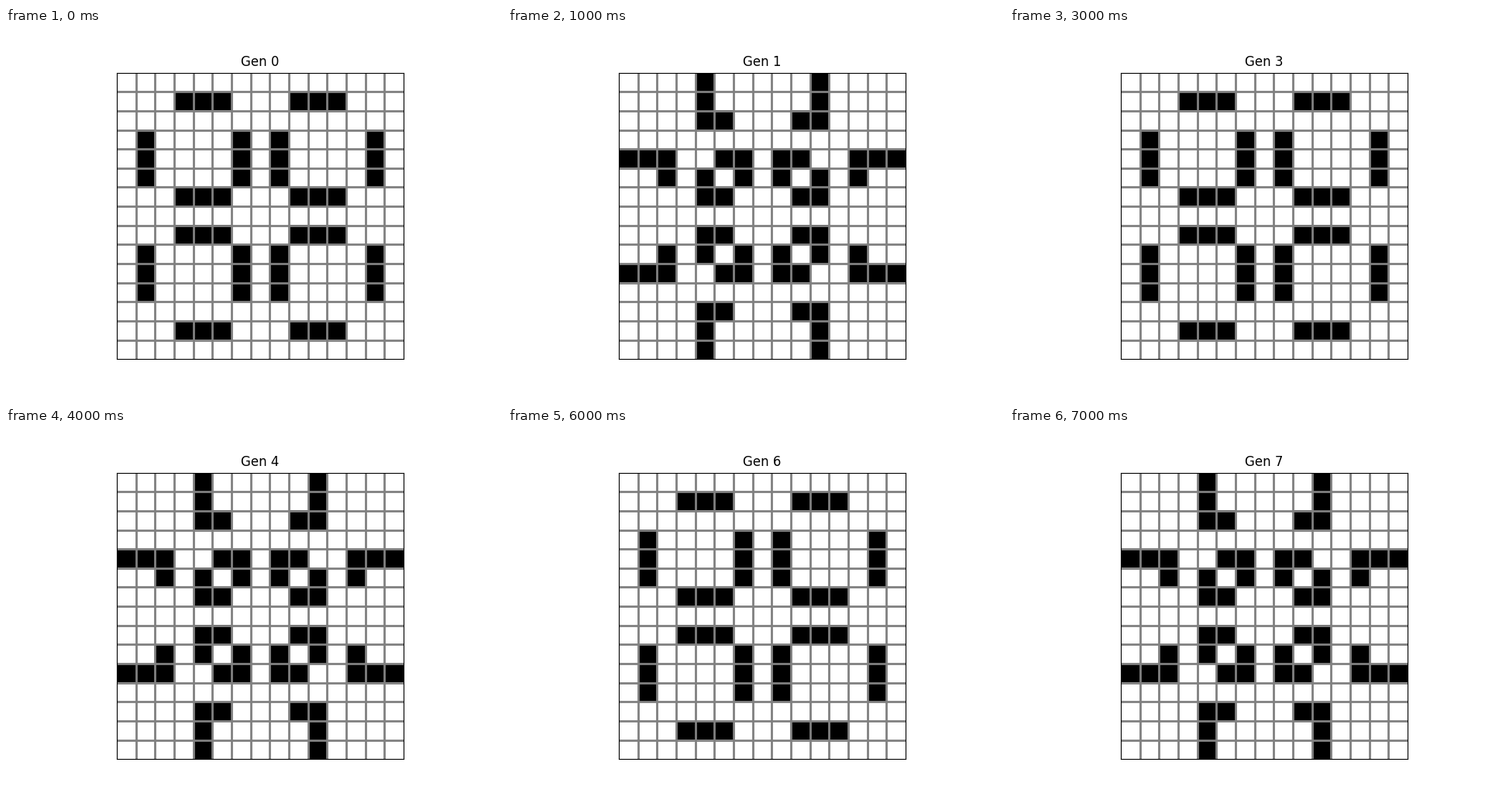
Write a matplotlib script that moves like this. It is 640 px wide and 480 px high and loops after 8 s.

```python
import numpy as np
import matplotlib.pyplot as plt
from matplotlib.animation import FuncAnimation

SIZE = 15
FRAMES = 8


def pulsar():
    """Period-3 oscillator, built from one bar pattern and its transpose."""
    grid = np.zeros((SIZE, SIZE), dtype=int)
    bars = [3, 4, 5, 9, 10, 11]
    rows = [1, 6, 8, 13]
    grid[np.ix_(rows, bars)] = 1
    return grid | grid.T


def step(grid):
    """One Game of Life generation with dead cells outside the board."""
    padded = np.pad(grid, 1)
    near = sum(padded[r:r + SIZE, c:c + SIZE]
               for r in range(3) for c in range(3)) - grid
    return ((near == 3) | ((grid == 1) & (near == 2))).astype(int)


generations = [pulsar()]
while len(generations) < FRAMES:
    generations.append(step(generations[-1]))

fig, ax = plt.subplots(figsize=(6.4, 4.8), dpi=100)
board = ax.imshow(generations[0], cmap="binary", vmin=0, vmax=1,
                  interpolation="nearest")
title = ax.set_title("Gen 0")

edges = np.arange(0.5, SIZE - 1)
ax.set_xticks(edges)
ax.set_yticks(edges)
ax.tick_params(length=0, labelbottom=False, labelleft=False)
ax.grid(color="gray", linewidth=2)


def update(i):
    board.set_data(generations[i])
    title.set_text(f"Gen {i}")
    return board, title


anim = FuncAnimation(fig, update, frames=FRAMES, interval=1000,
                     repeat=True, repeat_delay=0, blit=False)
plt.show()
```
